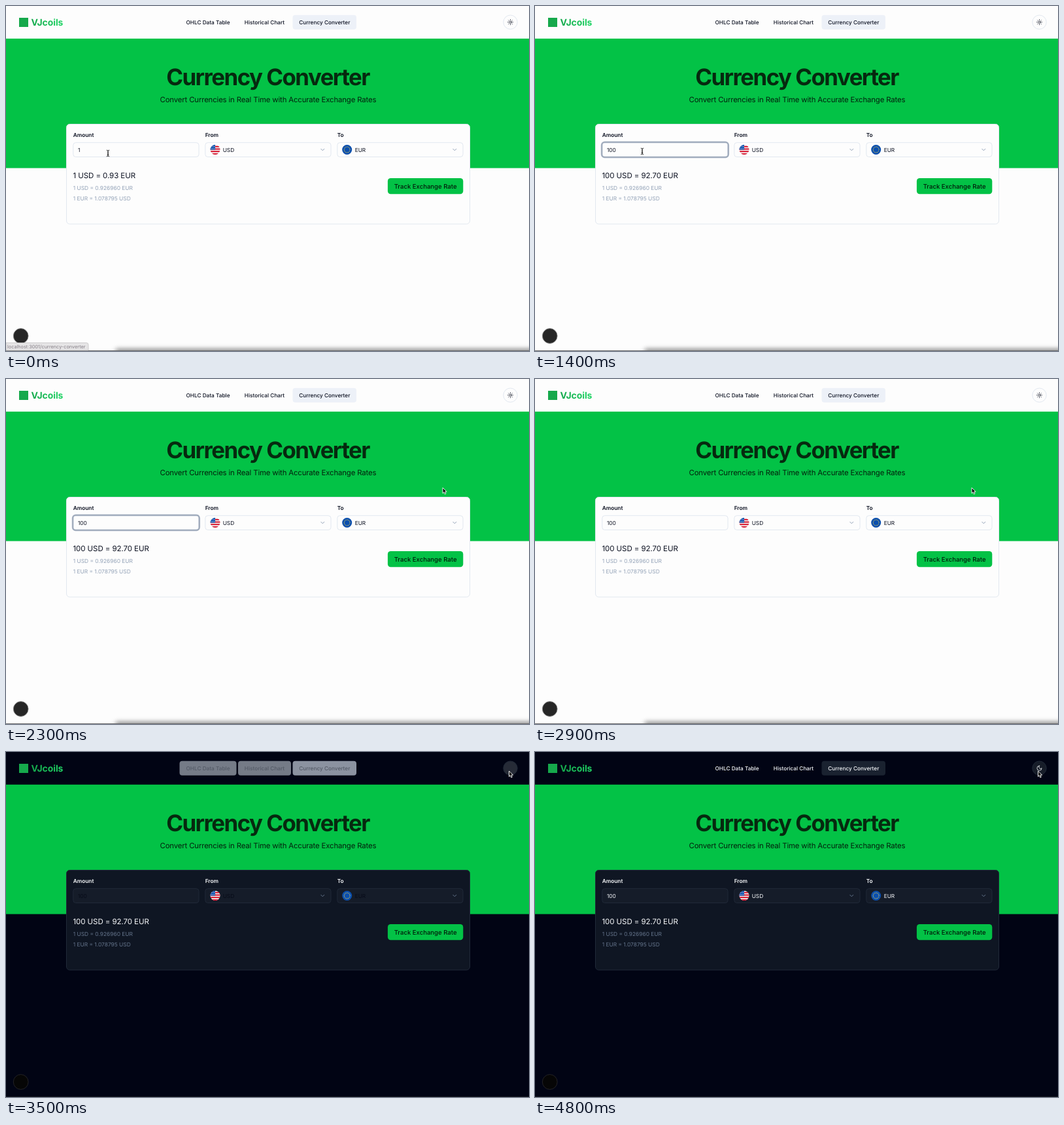
Write an HTML page that moves like this. It is 800 px wide and 527 px high and loops after 5000 ms.

```html
<!DOCTYPE html>
<html lang="en">
<head>
<meta charset="utf-8">
<title>Currency Converter</title>
<style>
  html, body { margin: 0; width: 100%; height: 100%; overflow: hidden; }
  svg { display: block; }
  #stage {
    --bg: #fdfdfd; --ink: #0b1020; --muted: #94a3b8; --line: #e2e8f0;
    --card: #fdfdfd; --field: #fdfdfd; --value: #0b1020;
    --tab: none; --active: #edf1f8; --tabInk: #0b1020;
    --toggle: #fdfdfd; --badge: #262626; --badgeLine: #8a8a8a; --edge: #6a6a6c;
    font-family: Inter, "Noto Sans", sans-serif;
    font-optical-sizing: none;
    text-rendering: geometricPrecision;
  }
  #stage.hover { --toggle: #edf1f8; }
  #stage.dark {
    --bg: #010414; --ink: #f8fafc; --muted: #64748b; --line: #202938;
    --card: #0f1623; --field: #151c29; --value: #f8fafc;
    --active: #1a2230; --tabInk: #f8fafc;
    --toggle: #171d29; --badge: #060606; --badgeLine: #2b2b2e; --edge: #14161f;
  }
  #stage.fading {
    --value: #070b18; --tab: #757b87; --active: #8b92a0; --tabInk: #555b67; --toggle: #262b37;
  }
  .bg { fill: var(--bg); }
  .green { fill: #03c246; }
  .card { fill: var(--card); stroke: var(--line); }
  .field { fill: var(--field); stroke: var(--line); }
  .tab { fill: var(--tab); }
  .tab.on { fill: var(--active); }
  .nav { font-size: 8.25px; font-weight: 500; fill: var(--tabInk); }
  .brand { font-size: 14px; font-weight: 700; letter-spacing: -.1px; fill: url(#brand); }
  .title { font-size: 34.8px; font-weight: 700; letter-spacing: -1.5px; fill: #06290f; }
  .sub { font-size: 11.4px; letter-spacing: -.16px; fill: #04200d; }
  .label { font-size: 8.3px; font-weight: 600; fill: var(--ink); }
  .value { font-size: 8.3px; fill: var(--value); }
  .result { font-size: 11.5px; letter-spacing: -.08px; fill: var(--ink); }
  .rate { font-size: 8.4px; fill: var(--muted); }
  .cta { font-size: 9.55px; font-weight: 500; fill: #021a0a; }
  .mid { text-anchor: middle; }
  .icon { fill: none; stroke: var(--ink); stroke-width: 2; stroke-linecap: round; stroke-linejoin: round; }
  .chev { fill: none; stroke: var(--muted); stroke-linecap: round; stroke-linejoin: round; }
  #moon, .dark #sun, .fading #moon, .dark .shade { display: none; }
  .dark:not(.fading) #moon { display: inline; }
  #ring rect { fill: none; stroke: #94a0b2; stroke-width: 1.5; }
  #ring .halo { stroke: #ccd3de; stroke-width: 3; }
  .shade { fill: #777; filter: blur(3.5px); }
  .status { font-size: 7.3px; fill: #857f87; }
</style>
</head>
<body>
<svg id="stage" width="800" height="527" viewBox="0 0 800 527">
  <defs>
    <linearGradient id="brand"><stop stop-color="#14a84c"/><stop offset="1" stop-color="#20d565"/></linearGradient>
    <clipPath id="disc"><circle r="7.5"/></clipPath>
    <path id="chevron" d="M-2.5-1.2L0 1.3 2.5-1.2"/>
  </defs>

  <rect class="bg" width="800" height="527"/>
  <rect class="shade" x="168" y="524" width="660" height="6"/>
  <rect class="green" y="49.8" width="800" height="197.8"/>

  <rect x="20" y="18" width="14" height="14" fill="#16a94c"/>
  <text class="brand" x="38.5" y="30">VJcoils</text>

  <rect class="tab" x="265.5" y="13.8" width="87" height="22" rx="4"/>
  <rect class="tab" x="355" y="13.8" width="81" height="22" rx="4"/>
  <rect class="tab on" x="438.5" y="13.8" width="97.5" height="22" rx="4"/>
  <g class="nav mid">
    <text x="309" y="27.8">OHLC Data Table</text>
    <text x="395.5" y="27.8">Historical Chart</text>
    <text x="487.3" y="27.8">Currency Converter</text>
  </g>

  <circle cx="771.5" cy="24.7" r="10.7" fill="var(--toggle)" stroke="var(--line)"/>
  <g class="icon" transform="translate(766.7 19.9) scale(.4)">
    <g id="sun">
      <circle cx="12" cy="12" r="4"/>
      <path d="M12 2v2M12 20v2M2 12h2M20 12h2M4.9 4.9l1.4 1.4M17.7 17.7l1.4 1.4M4.9 19.1l1.4-1.4M17.7 6.3l1.4-1.4"/>
    </g>
    <path id="moon" d="M12 3a6 6 0 0 0 9 9 9 9 0 1 1-9-9Z"/>
  </g>

  <text class="title mid" x="400.6" y="120.5">Currency Converter</text>
  <text class="sub mid" x="400.9" y="147.3">Convert Currencies in Real Time with Accurate Exchange Rates</text>

  <rect class="card" x="92.5" y="180.5" width="617" height="152.5" rx="5"/>
  <g class="label">
    <text x="102.7" y="200.2">Amount</text>
    <text x="304.7" y="200.2">From</text>
    <text x="506.7" y="200.2">To</text>
  </g>
  <rect class="field" x="102.8" y="208.7" width="192.2" height="21.8" rx="4"/>
  <rect class="field" x="304.8" y="208.7" width="192.2" height="21.8" rx="4"/>
  <rect class="field" x="506.8" y="208.7" width="192.2" height="21.8" rx="4"/>
  <g id="ring">
    <rect class="halo" x="102.1" y="207.9" width="193.6" height="23.2" rx="4.5"/>
    <rect x="102.1" y="207.9" width="193.6" height="23.2" rx="4.5"/>
  </g>

  <g transform="translate(320 219.5)" clip-path="url(#disc)">
    <rect x="-8" y="-8" width="16" height="16" fill="#f2f2f2"/>
    <path d="M-8-4.7H8M-8-.95H8M-8 2.8H8M-8 6.55H8" stroke="#d8102a" stroke-width="1.87"/>
    <rect x="-8" y="-8" width="8" height="8" fill="#0c50ac"/>
    <path d="M-6-4.8H0M-6.5-1.8H0" stroke="#e8eef8" stroke-width="1.1" stroke-dasharray="1.1 1.2"/>
  </g>
  <g transform="translate(521.7 219.5)">
    <circle r="7.5" fill="#0b4fae"/>
    <circle r="4.4" fill="none" stroke="#f2d64b" stroke-width="1.2" stroke-linecap="round" stroke-dasharray=".01 2.29"/>
  </g>
  <g class="value">
    <text id="amount" x="110" y="222.6"></text>
    <text x="331.7" y="222.6">USD</text>
    <text x="533.7" y="222.6">EUR</text>
  </g>
  <g class="chev">
    <use href="#chevron" x="484.3" y="219.5"/>
    <use href="#chevron" x="686.3" y="219.5"/>
  </g>

  <text class="result" id="result" x="102.5" y="262.6"></text>
  <text class="rate" x="102.7" y="280.6">1 USD = 0.926960 EUR</text>
  <text class="rate" x="102.7" y="297.4">1 EUR = 1.078795 USD</text>
  <rect class="green" x="583.9" y="262.9" width="115.4" height="24.3" rx="4.5"/>
  <text class="cta mid" x="641.6" y="278.5">Track Exchange Rate</text>

  <circle cx="22.7" cy="504" r="11.4" fill="var(--badge)" stroke="var(--badgeLine)" stroke-width=".8"/>

  <rect y="526" width="800" height="1" fill="var(--edge)"/>
  <g id="status">
    <path d="M0 514.5H123q3 0 3 3V526H0Z" fill="#e6e5e6" stroke="#c4c3c5" stroke-width=".8"/>
    <text class="status" x="2" y="523">localhost:3001/currency-converter</text>
  </g>

  <g id="pointer">
    <path id="beam" d="M-1.8-4.8Q0-4.8 0-3.6V3.6Q0 4.8-1.8 4.8M1.8-4.8Q0-4.8 0-3.6V3.6Q0 4.8 1.8 4.8M-.9 2.1H.9"
      fill="none" stroke="#222" stroke-width=".9" stroke-linecap="round"/>
    <path id="arrow" d="M0 0V8.6L1.9 6.8 3.3 10 4.8 9.3 3.5 6.2H6.1Z" fill="#080808" stroke="#fff" stroke-width=".9" stroke-linejoin="round"/>
  </g>
</svg>
<script>
  const LOOP = 5000, STEP = 100, RATE = 0.92696;
  const $ = id => document.getElementById(id);
  const show = (id, on) => $(id).style.visibility = on ? "visible" : "hidden";

  // Pointer stops: time, x, y
  const path = [
    [0, 156, 225], [200, 156, 225], [600, 164, 222], [1700, 164, 222],
    [2300, 668, 166], [3000, 668, 166], [3300, 769.5, 29]
  ];

  function pointerAt(t) {
    let i = path.length - 1;
    while (path[i][0] > t) i--;
    const a = path[i], b = path[i + 1] || a;
    const p = b === a ? 0 : (t - a[0]) / (b[0] - a[0]);
    const e = p * p * (3 - 2 * p);
    return [a[1] + (b[1] - a[1]) * e, a[2] + (b[2] - a[2]) * e];
  }

  function draw(t) {
    const amount = t < 900 ? 1 : t < 1100 ? 10 : 100;
    $("amount").textContent = amount;
    $("result").textContent = `${amount} USD = ${(amount * RATE).toFixed(2)} EUR`;

    const [x, y] = pointerAt(t);
    const inField = x > 103 && x < 295 && y > 208 && y < 231;
    $("pointer").setAttribute("transform", `translate(${x} ${y})`);
    show("beam", inField);
    show("arrow", !inField);
    show("status", t < 300);
    show("ring", t >= 600 && t < 2700);

    const css = $("stage").classList;
    css.toggle("hover", Math.hypot(x - 771.5, y - 24.7) < 11);
    css.toggle("dark", t >= 3500);
    css.toggle("fading", t >= 3500 && t < 3600);
  }

  const start = performance.now();
  function tick() {
    const t = (performance.now() - start) % LOOP;
    draw(Math.floor(t / STEP) * STEP);
    requestAnimationFrame(tick);
  }
  tick();
</script>
</body>
</html>
```
